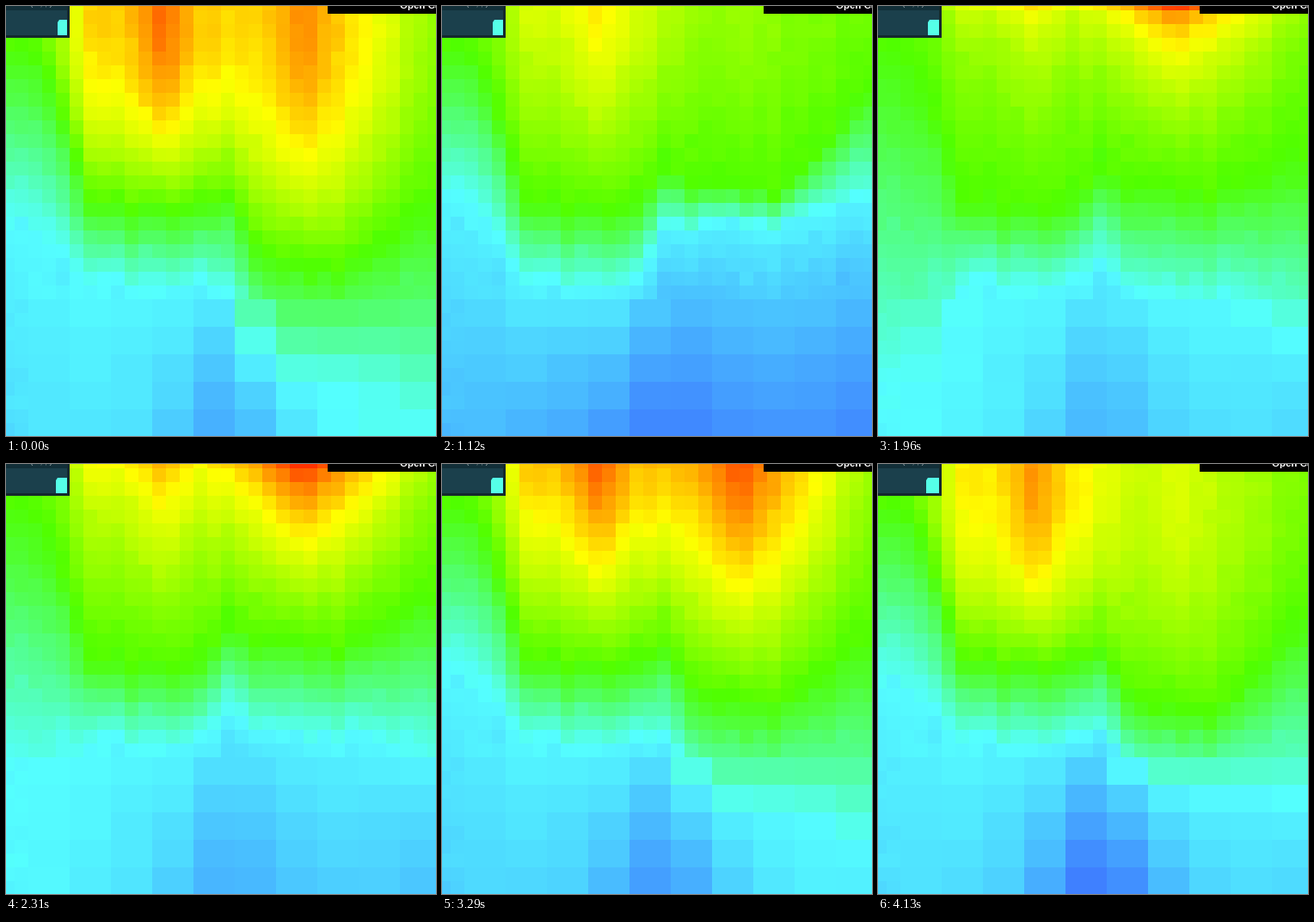
These frames come from a looping animation (500 by 500 pixels, 4200 ms). A matplotlib script:

```python
import numpy as np
import matplotlib.pyplot as plt
from matplotlib.animation import FuncAnimation
from matplotlib.patches import Polygon, Rectangle

SIZE, CELL, FRAMES, STEP = 500, 16, 60, 70
N = 32
CX = 2 + CELL * np.arange(N)
CY = -3 + CELL * np.arange(N)
Y = np.clip(CY, 0, SIZE)[:, None]

# heat ramp: blue, cyan, green, yellow, red at levels 0..4
RAMP = np.array([(60, 110, 255), (85, 255, 255), (80, 255, 0),
                 (255, 255, 0), (255, 50, 0)]) / 255

# two warm plumes over a cold floor, keyed at a few beats
BEATS = [0, 9, 22, 28, 39, 47, 59]
TRACKS = dict(
    left=[3.25, 2.85, 2.75, 2.85, 3.2, 3.3, 3.1],       # plume heat
    right=[3.15, 2.4, 2.25, 3.45, 3.6, 3.35, 2.6],
    bow=[1.9, 2, .6, .5, 1.1, 1.2, 2],                  # how long heat lasts
    reach=[300, 212, 215, 215, 205, 275, 285],          # right plume length
    ltail=[255, 240, 212, 450, 240, 240, 255],          # cyan line at the sides
    rtail=[510, 235, 215, 400, 295, 455, 400],
    chill=[.55, .4, .15, .4, .3, .55, .75],             # depth of cold trough
)

rng = np.random.default_rng(4)
GRAIN = rng.normal(0, .02, (1, N)) + rng.normal(0, .02, (N, N))
RAGGED = rng.uniform(-7, 7, N)


def bell(x, width):
    return np.exp(-((CX - x) / width) ** 2)


def across(edge_l, plume_l, plume_r, edge_r):
    return np.interp(CX, [40, 100, 225, 310, 405, 495],
                     [edge_l, plume_l, plume_l, plume_r, plume_r, edge_r])


def blocks(field):
    """Join cells into larger tiles towards the cold bottom."""
    out = field.copy()
    for r in range(22, N, 2):
        band = field[r:r + 2].mean(axis=0)
        for c in range(2, N, 3):
            out[r:r + 2, c:c + 3] = band[c:c + 3].mean()
    return out


def heat(k):
    p = {name: np.interp(k, BEATS, track) for name, track in TRACKS.items()}
    top = across(2.1, p["left"], p["right"], 1.6 + .25 * p["right"])
    top = 2 + (top - 2) * (1 + .35 * bell(182, 28) + .35 * bell(345, 35))

    # heights of the green and cyan lines in every column
    notch = 40 * bell(260, 24) + RAGGED
    green = across(50, 235, p["reach"], .45 * p["rtail"]) - notch
    joint = (p["reach"] + p["rtail"]) / 2 + 35
    cyan = across(p["ltail"], 325, joint, p["rtail"]) - notch
    cyan = np.maximum(cyan, green + 40)

    low_l = 1 - .6 * np.exp((212 - p["ltail"]) / 40)
    low_r = p["rtail"] / 320 - .5
    low = np.interp(CX, [0, SIZE], [low_l, low_r]) - p["chill"] * bell(258, 75)

    hot = 2 + (top - 2) * (1 - (Y / green) ** p["bow"])
    mid = 2 - (Y - green) / (cyan - green)
    depth = np.clip((Y - cyan) / np.maximum(SIZE - cyan, 1), 0, 1)
    cold = 1 - (1 - low) * depth ** .7
    field = np.where(Y < green, hot, np.where(Y < cyan, mid, cold))
    return blocks(field + GRAIN)


def colour(field):
    return np.stack([np.interp(field, range(5), ch) for ch in RAMP.T], axis=-1)


def thumb(k):
    x = 60 - 4 * k / (FRAMES - 1)
    return [(x + 2, 16), (71, 16), (71, 34), (x, 34), (x, 19)]


fig = plt.figure(figsize=(5, 5), dpi=100)
ax = fig.add_axes([0, 0, 1, 1])
image = ax.imshow(colour(heat(0)), extent=(-6, 506, 501, -11),
                  interpolation="nearest", aspect="auto")
ax.set(xlim=(0, SIZE), ylim=(SIZE, 0))
ax.axis("off")


def box(x, y, w, h, fill):
    ax.add_patch(Rectangle((x, y), w, h, fc=fill, lw=0, zorder=2))


def label(x, y, text, px, fill, **kw):
    ax.text(x, y, text, fontsize=px * .72, color=fill, va="baseline",
            family="Liberation Sans", clip_on=True, zorder=4, **kw)


box(0, 0, 74, 37, "#14282e")
box(0, 0, 71, 34, "#1b404c")
box(0, 0, 71, 5, "#122f38")
label(28, 0, "( / , , )", 10, "#9aa6aa")
box(374, 0, 126, 8.5, "#000000")
label(458, 3, "Open Ca", 11.5, "white", weight="bold")
knob = ax.add_patch(Polygon(thumb(0), fc="#55ffe8", lw=0, zorder=3))


def draw(k):
    image.set_data(colour(heat(k)))
    knob.set_xy(thumb(k))
    return image, knob


anim = FuncAnimation(fig, draw, frames=FRAMES, interval=STEP,
                     repeat=True, repeat_delay=0)
plt.show()
```
